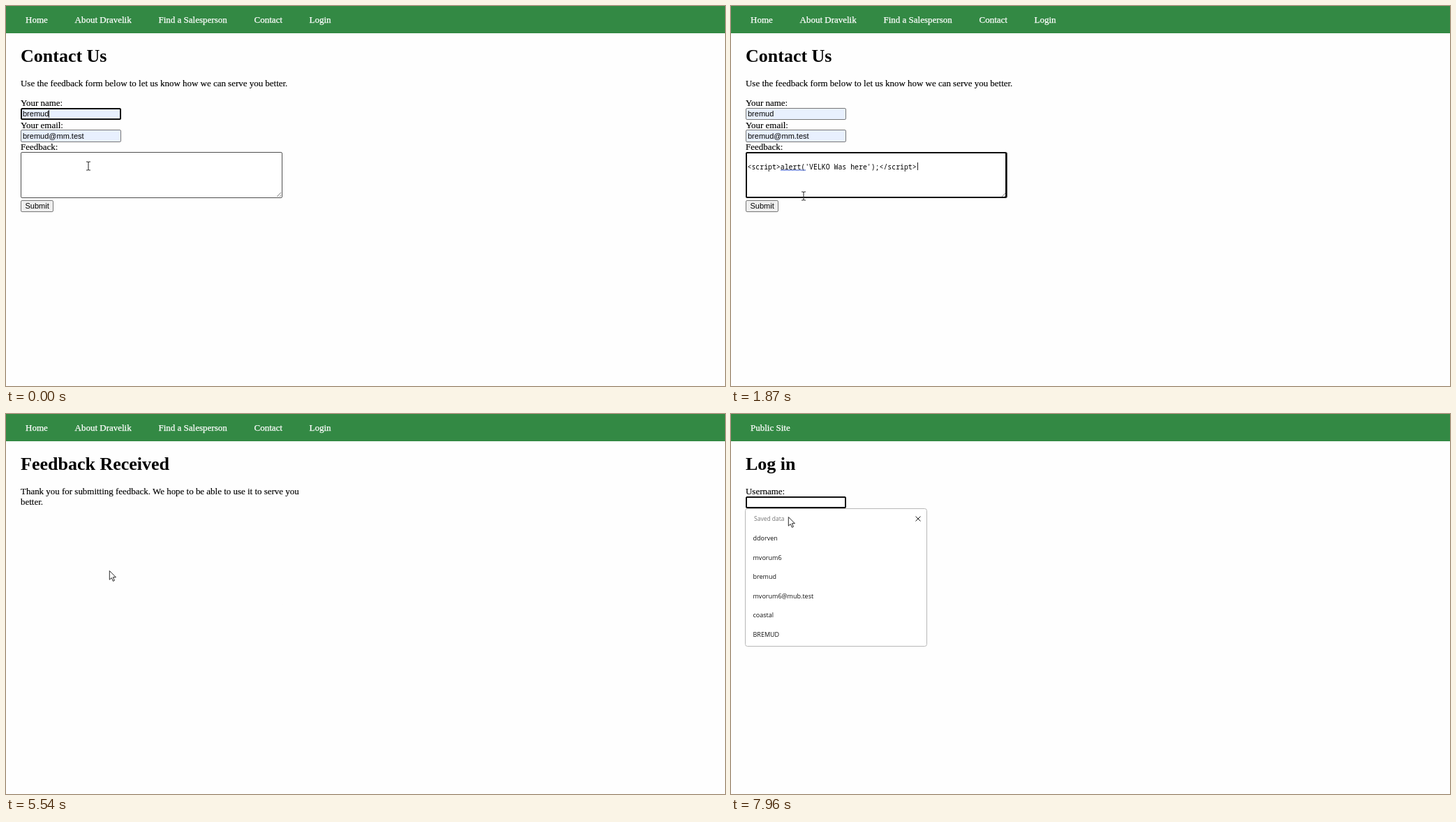
An HTML page for the animation above (8000 ms loop, 1030x544 px).

```html
<!DOCTYPE html>
<html lang="en">
<head>
<meta charset="utf-8">
<title>Contact form</title>
<style>
html, body { margin: 0; width: 100%; height: 100%; overflow: hidden; background: #fefefe; }
svg { display: block; }
text { white-space: pre; }
.body { font: 12.96px "Liberation Serif", "Times New Roman", serif; fill: #000; stroke: #000; stroke-width: .15; }
.head { font: bold 26px "Liberation Serif", "Times New Roman", serif; }
.nav { font: 13px "Liberation Serif", "Times New Roman", serif; fill: #fff; stroke: #fff; stroke-width: .25; }
.field { font: 11px "Liberation Sans", Arial, sans-serif; }
.code { font: 9.86px "Noto Sans Mono", "DejaVu Sans Mono", monospace; }
.ui { font: 9.25px "Open Sans", "Noto Sans", sans-serif; fill: #1a1a1a; }
.drop { font: 9px "Open Sans", "Noto Sans", sans-serif; fill: #111; }
.note { font: 8.5px "Open Sans", "Noto Sans", sans-serif; fill: #767676; }
.end { text-anchor: end; }
.off { fill: #a6a6a6; }
.icon { fill: none; stroke: #222; stroke-width: .9; stroke-linecap: round; stroke-linejoin: round; }
.dim { stroke: #a6a6a6; }
</style>
</head>
<body>
<svg id="stage" width="1030" height="544" viewBox="0 0 1030 544"></svg>
<script>
const LOOP = 8000;
const stage = document.getElementById('stage');

function add(parent, tag, attrs, content) {
  const el = document.createElementNS('http://www.w3.org/2000/svg', tag);
  for (const key in attrs) el.setAttribute(key, attrs[key]);
  if (content) el.textContent = content;
  parent.append(el);
  return el;
}
const group = (parent = stage) => add(parent, 'g', {});
const label = (parent, cls, x, y, content) => add(parent, 'text', { class: cls, x, y }, content);
const path = (parent, d, attrs) => add(parent, 'path', { d, ...attrs });

function box(parent, x, y, width, height, fill, stroke = '#767676') {
  return add(parent, 'rect', { x: x + .5, y: y + .5, width: width - 1, height: height - 1, rx: 1.6, fill, stroke });
}
function focusRing(parent, x, y, width, height) {
  return add(parent, 'rect', { x: x + 1, y: y + 1, width: width - 2, height: height - 2, rx: 1.5,
    fill: 'none', stroke: '#101010', 'stroke-width': 2 });
}
function button(parent, y) {
  const face = box(parent, 21, y, 47, 17, '#efefef');
  label(parent, 'field', 27.5, y + 12, 'Submit');
  return face;
}

// Navigation bar
add(stage, 'rect', { width: 1030, height: 39, fill: '#338944' });
const siteNav = group();
[[28, 'Home'], [98.5, 'About Dravelik'], [218.5, 'Find a Salesperson'], [355.5, 'Contact'], [434.5, 'Login']]
  .forEach(([x, name]) => label(siteNav, 'nav', x, 24, name));

// Contact page
const contact = group();
label(contact, 'head', 21, 80, 'Contact Us');
label(contact, 'body', 21, 115, 'Use the feedback form below to let us know how we can serve you better.');
label(contact, 'body', 21, 143, 'Your name:');
box(contact, 21, 146, 144, 17, '#e8f0fe');
label(contact, 'field', 24, 158, 'bremud');
label(contact, 'body', 21, 175, 'Your email:');
box(contact, 21, 177, 144, 18, '#e8f0fe');
label(contact, 'field', 24, 190, 'bremud@mm.test');
label(contact, 'body', 21, 206, 'Feedback:');
const area = box(contact, 21, 209, 375, 66, '#fff');
path(contact, 'M388 273l6-6M392 273l2-2', { stroke: '#777', 'stroke-width': .9 });
const nameRing = focusRing(contact, 21, 146, 144, 17);
const areaRing = focusRing(contact, 21, 209, 374, 66);
const pasted = group(contact);
label(pasted, 'code', 23.5, 233.8, "<script>alert('VELKO Was here');<\/script>");
path(pasted, 'M71 235H107', { stroke: '#3454c8' });
const submit = button(contact, 278);

// Thank-you page
const thanks = group();
label(thanks, 'head', 21, 80, 'Feedback Received');
label(thanks, 'body', 21, 115, 'Thank you for submitting feedback. We hope to be able to use it to serve you');
label(thanks, 'body', 21, 130, 'better.');

// Login page
const login = group();
label(login, 'nav', 28, 24, 'Public Site');
label(login, 'head', 21, 80, 'Log in');
label(login, 'body', 21, 115, 'Username:');
box(login, 21, 118, 144, 17, '#fff');
label(login, 'body', 21, 147, 'Password:');
box(login, 21, 150, 144, 17, '#fff');
button(login, 167);
const userRing = focusRing(login, 21, 118, 144, 17);

const saved = group(login);
add(saved, 'rect', { x: 20.5, y: 135.5, width: 260, height: 197, rx: 3, fill: '#fff', stroke: '#b8b8b8' });
label(saved, 'note', 33, 153, 'Saved data');
path(saved, 'M264.5 146.5l7 7m0-7l-7 7', { stroke: '#222' });
['ddorven', 'mvorum6', 'bremud', 'mvorum6@mub.test', 'coastal', 'BREMUD']
  .forEach((name, i) => label(saved, 'drop', 31.5, 181.3 + 27.5 * i, name));

const caret = add(stage, 'rect', { width: 1, height: 11, fill: '#222' });

// Context menu; icons are centred on the origin
const ICON = {
  smile: 'M6 0A6 6 0 1 1-6 0A6 6 0 1 1 6 0M-3 1.8Q0 5 3 1.8M-2-2v.4M2-2v.4',
  undo: 'M-5-6V-1.5H-.5M-5-1.5L-1.5-4.5C3-7.5 7-2.5 3.5 1L-1.5 6',
  redo: 'M5-6V-1.5H.5M5-1.5L1.5-4.5C-3-7.5-7-2.5-3.5 1L1.5 6',
  cut: 'M-4-6L2.5 3M4-6L-2.5 3M-1.5 4.5A2 2 0 1 1-5.5 4.5A2 2 0 1 1-1.5 4.5M5.5 4.5A2 2 0 1 1 1.5 4.5A2 2 0 1 1 5.5 4.5',
  copy: 'M-2-6H4Q5-6 5-5V3Q5 4 4 4H-2Q-3 4-3 3V-5Q-3-6-2-6M-3-4Q-5-4-5-2V4Q-5 6-3 6H2',
  paste: 'M-1 5H-4Q-5.5 5-5.5 4V-4Q-5.5-5-4-5H2Q3-5 3-3M-3-6.5H.5V-4H-3ZM0-2H5Q6-2 6-1V5Q6 6 5 6H0Q-1 6-1 5V-1Q-1-2 0-2',
  collect: 'M-2-2H5Q6-2 6-1V5Q6 6 5 6H-1Q-2 6-2 5ZM2 0V4M0 2H4M-2 3H-4Q-6 3-6 1V-4Q-6-6-4-6H1Q3-6 3-4',
  share: 'M-1-4H-5V5H4V2M1-6L6-2.5L1 1V-1Q-2-1-3 2Q-3-4 1-4Z'
};
const ROWS = [
  [245, 'Emoji', 'Win+Period', 'smile'],
  [275, 'Undo', 'Ctrl+Z', 'undo'],
  [301, 'Redo', 'Ctrl+Shift+Z', 'redo', 1],
  [331, 'Cut', 'Ctrl+X', 'cut', 1],
  [357, 'Copy', 'Ctrl+C', 'copy', 1],
  [383, 'Paste', 'Ctrl+V', 'paste'],
  [409, 'Paste as plain text', 'Ctrl+Shift+V'],
  [435, 'Select all', 'Ctrl+A', '', 1],
  [465, 'Add page to Collections', '>', 'collect', 1],
  [495, 'Writing direction', '>'],
  [525, 'Share', '', 'share']
];
const menu = group();
for (let i = 5; i > 0; i--) {
  add(menu, 'rect', { x: 117 - i * .7, y: 232 - i * .3, width: 234 + i * 1.4, height: 330, rx: 4, fill: '#000', opacity: .035 });
}
add(menu, 'rect', { x: 117, y: 231, width: 234, height: 330, rx: 3, fill: '#fff' });
const hover = add(menu, 'rect', { x: 117, width: 234, height: 26, fill: '#f0f0f0' });
for (const y of [260, 316, 450, 480, 510, 540]) path(menu, `M117 ${y - .5}H351`, { stroke: '#dedede' });
for (const [y, name, keys, icon, off] of ROWS) {
  const line = off ? 'icon dim' : 'icon';
  label(menu, off ? 'ui off' : 'ui', 150.5, y + 3.5, name);
  if (keys === '>') path(menu, `M332 ${y - 4}l4 4l-4 4`, { class: line });
  else label(menu, off ? 'ui end off' : 'ui end', 319, y + 3.5, keys);
  if (icon) path(menu, ICON[icon], { class: line, transform: `translate(134.5 ${y})` });
}

// Mouse pointers
const pointers = {
  beam: path(stage, 'M-3-6H-1L0-5.3L1-6H3M0-5.3V5.3M-3 6H-1L0 5.3L1 6H3', { fill: 'none', stroke: '#333', 'stroke-width': 1.1 }),
  arrow: path(stage, 'M.3.5V13.2L3.3 10.5 5.4 15.3 7.4 14.4 5.4 9.7H9.4Z', { fill: '#fff', stroke: '#111', 'stroke-width': .9 }),
  hand: path(stage, 'M4 10V1.8C4 .2 6.4 .2 6.4 1.8V7C7 6.2 8.6 6.4 8.8 7.4 9.4 6.8 10.8 7 11 8 11.8 7.5 13 8 13 9.2V13C13 15 11.8 16 11.5 18.5H5C4.6 16.5 2 13.5 .6 11.4-.2 10 1.6 8.8 2.6 10.2L4 11.8Z',
    { fill: '#fff', stroke: '#111', 'stroke-width': .9 })
};

// Steps: start time, then the values held until the next step
const MOUSE = [
  [0, 'beam', 118, 229], [640, 'arrow', 117, 230], [880, 'arrow', 121, 262], [1000, 'arrow', 129, 322],
  [1120, 'arrow', 138, 370], [1240, 'arrow', 142, 383], [1600, 'arrow', 115, 335], [1720, 'arrow', 97, 300],
  [1870, 'beam', 104, 272], [2020, 'beam', 108, 256], [2140, 'beam', 110, 246], [2290, 'beam', 78, 232],
  [2440, 'beam', 110, 232], [2560, 'beam', 149, 231], [2710, 'beam', 208, 228],
  [2860, 'beam', 203, 227], [2980, 'beam', 176, 242], [3100, 'beam', 120, 267], [3220, 'arrow', 79, 282],
  [3370, 'arrow', 66, 286], [3520, 'arrow', 61, 286], [3640, 'arrow', 58, 286],
  [5540, 'arrow', 148, 224], [5680, 'arrow', 270, 237], [5830, 'arrow', 262, 200], [5950, 'arrow', 295, 140],
  [6070, 'arrow', 365, 82], [6190, 'arrow', 425, 45], [6310, 'hand', 441, 20],
  [6860, 'arrow', 447, 27], [7010, 'arrow', 329, 115], [7160, 'arrow', 180, 136], [7280, 'beam', 75, 121],
  [7840, 'arrow', 78, 138], [7960, 'arrow', 82, 147]
];
const CARET = [
  [0, 61, 149], [120, 23, 212], [1120], [1480, 267, 224], [2140], [2560, 267, 224], [3100],
  [3520, 267, 224], [4040], [7420, 24, 121], [7840]
];
const MENU = [[0, 0], [640, .6], [760, 1], [1480, .75], [1600, .4], [1720, 0]];
const SAVED = [[0, 0], [7420, .2], [7570, .65], [7690, 1]];

const at = (steps, t) => steps.findLast(step => step[0] <= t);
const show = (el, on) => el.setAttribute('visibility', on ? 'inherit' : 'hidden');

function draw(t) {
  show(siteNav, t < 6730);
  show(contact, t < 5120);
  show(thanks, t >= 5120 && t < 6730);
  show(login, t >= 6730);
  show(nameRing, t < 120);
  show(areaRing, t >= 120 && t < 4590);
  show(pasted, t >= 1480);
  show(userRing, t >= 7420);

  const over = t >= 3370;
  const pressed = t >= 4590 && t < 4720;
  submit.setAttribute('fill', pressed ? '#f5f5f5' : over ? '#e5e5e5' : '#efefef');
  submit.setAttribute('stroke', pressed ? '#8d8d8d' : over ? '#4f4f4f' : '#767676');
  area.setAttribute('stroke', over ? '#767676' : '#4f4f4f');

  const [, kind, x, y] = at(MOUSE, t);
  for (const name in pointers) show(pointers[name], name === kind);
  pointers[kind].setAttribute('transform', `translate(${x} ${y})`);

  const [, cx, cy] = at(CARET, t);
  show(caret, cx !== undefined);
  if (cx !== undefined) {
    caret.setAttribute('x', cx);
    caret.setAttribute('y', cy);
  }

  const row = ROWS.find(r => Math.abs(r[0] - y) < 13);
  show(hover, row && t >= 880);
  if (row) hover.setAttribute('y', row[0] - 13);
  menu.setAttribute('opacity', at(MENU, t)[1]);
  saved.setAttribute('opacity', at(SAVED, t)[1]);
}

const start = performance.now();
function tick() {
  draw((performance.now() - start) % LOOP);
  requestAnimationFrame(tick);
}
tick();
</script>
</body>
</html>
```
